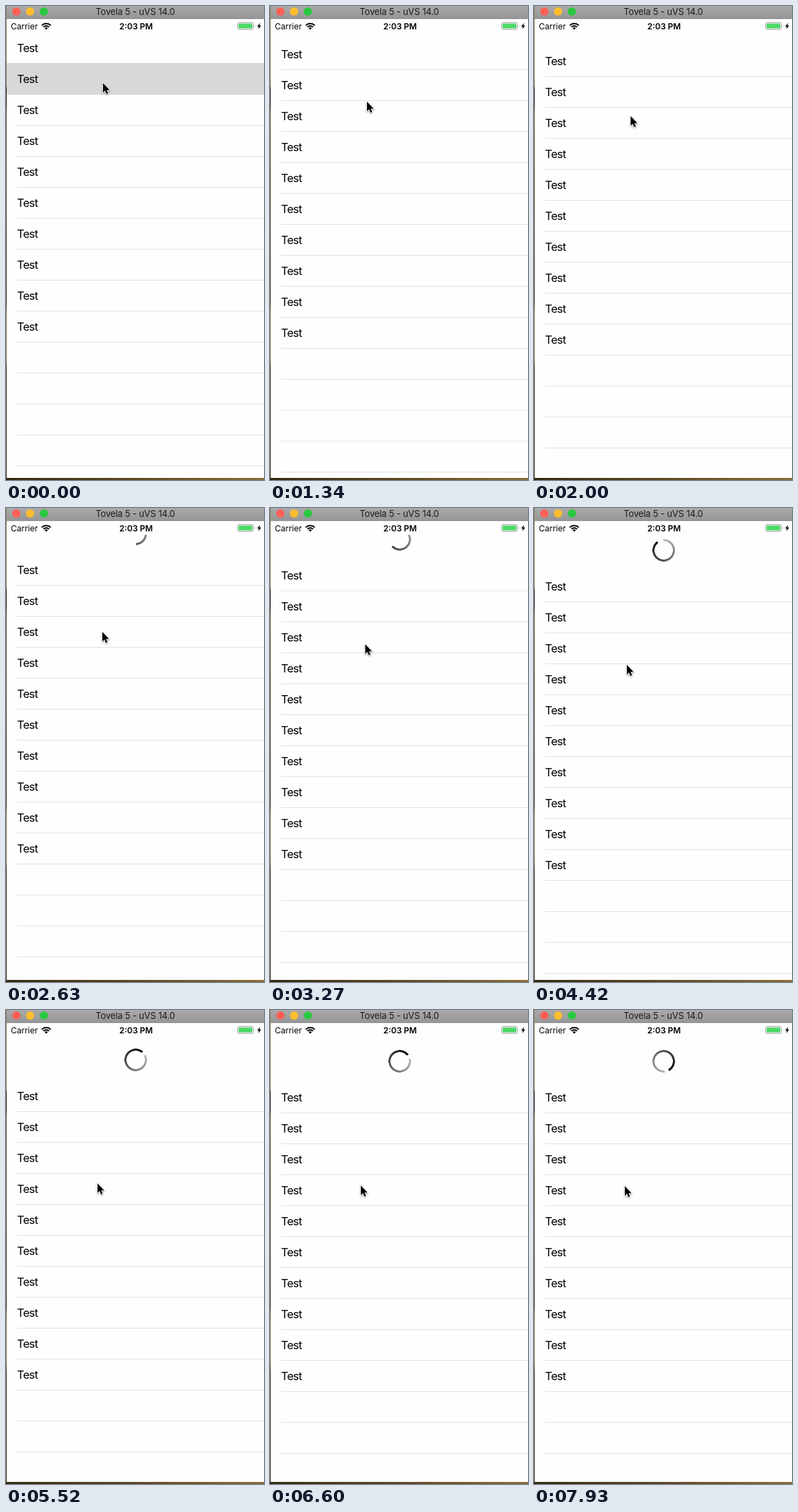
An HTML page for the animation above (7.99 s loop, 375 by 689 pixels).

```html
<!DOCTYPE html>
<html lang="en">
<head>
<meta charset="utf-8">
<title>Pull to refresh</title>
<style>
  @property --pull { syntax: "<integer>"; inherits: true; initial-value: 0; }
  @property --spin { syntax: "<angle>"; inherits: true; initial-value: 0deg; }

  html, body { margin: 0; width: 100%; height: 100%; overflow: hidden; }
  body { font-family: Inter, Roboto, sans-serif; color: #000; }

  #stage {
    position: relative; width: 375px; height: 689px; overflow: hidden;
    background:
      linear-gradient(90deg, #33290f, #57451f 45%, #8a6d38) 0 686px / 100% 3px no-repeat,
      linear-gradient(#8f8256 0 115px, #2b2314 120px 145px, #6d5c33 155px, #3b301a 430px, #8b7440 445px 515px, #3d3018 525px);
    animation: pull 7990ms linear infinite, spin 7990ms linear infinite;
  }
  #stage > *, #view > * { position: absolute; }

  #titlebar {
    left: 1px; top: 0; right: 0; height: 19px; line-height: 17px;
    background: linear-gradient(#aaa, #949494);
    font-size: 13px; letter-spacing: -.15px; text-align: center; color: #1c1c1c;
  }
  #titlebar i { position: absolute; top: 2px; width: 12px; height: 12px; border-radius: 50%; }

  #status { left: 1px; top: 19px; right: 0; height: 20px; background: #fefefe; font-size: 12px; line-height: 21px; }
  #status > * { position: absolute; top: 0; }
  #time { left: 0; right: 0; text-align: center; font-weight: 600; padding-left: 2px; }

  #view { left: 1px; top: 39px; right: 0; height: 647px; overflow: hidden; background: #fefefe; }

  #list {
    left: 0; right: 0; top: calc(var(--pull) * 1px); height: 675px; margin: 0; padding: 0 0 0 15px;
    list-style: none; font-size: 16.5px; letter-spacing: -.7px; line-height: 45px;
    background: repeating-linear-gradient(#0000 0 44px, #e1e1e3 44px 45px) 15px 0 no-repeat;
  }
  #list li { position: relative; height: 45px; }
  .pressed::before {
    content: ""; position: absolute; z-index: -1; left: -15px; right: 0; top: -1px; height: 46px;
    background: #d8d8d8; animation: press 7990ms linear infinite;
  }
  #list { isolation: isolate; }

  #spinner {
    left: 171px; top: calc(var(--pull) * 1px - 47px); width: 33px; height: 33px;
    background: conic-gradient(#bbb, #000 338deg);
    mask:
      conic-gradient(#000 min(var(--pull) * 6.1deg, 338deg), #0000 0),
      radial-gradient(circle, #0000 13px, #000 13.6px 16px, #0000 16.6px);
    mask-composite: intersect;
    transform: rotate(var(--spin));
  }

  #cursor {
    left: 0; top: 0; overflow: visible; filter: drop-shadow(0 1px 1px #0006);
    animation: drag 7990ms linear infinite;
  }

  @keyframes press {
    0%, 1.5% { visibility: visible; }
    1.501%, 100% { visibility: hidden; }
  }
  @keyframes pull {
    0%, 1.5% { --pull: 0; }
    8.89%, 11.01% { --pull: 2; }
    16.77% { --pull: 9; }
    20.53% { --pull: 14; }
    32.92% { --pull: 29; }
    40.93% { --pull: 37; }
    48.06% { --pull: 46; }
    50.94% { --pull: 49; }
    55.32% { --pull: 53; }
    61.2% { --pull: 58; }
    69.09% { --pull: 64; }
    71.96% { --pull: 65; }
    81.85%, 100% { --pull: 66; }
  }
  @keyframes spin {
    0%, 66.83% { --spin: 0deg; }
    100% { --spin: 913deg; }
  }
  @keyframes drag {
    0%, 1.5% { transform: translate(141px, 112px); }
    8.89%, 11.01% { transform: translate(141px, 125px); }
    16.77% { transform: translate(141px, 139px); }
    32.92% { transform: translate(140px, 180px); }
    48.06% { transform: translate(137px, 214px); }
    55.32% { transform: translate(135px, 228px); }
    69.09% { transform: translate(133px, 252px); }
    81.85% { transform: translate(132px, 255px); }
    92.12%, 100% { transform: translate(132px, 256px); }
  }
</style>
</head>
<body>
<div id="stage">
  <div id="view">
    <ul id="list">
      <li>Test</li>
      <li class="pressed">Test</li>
      <li>Test</li>
      <li>Test</li>
      <li>Test</li>
      <li>Test</li>
      <li>Test</li>
      <li>Test</li>
      <li>Test</li>
      <li>Test</li>
    </ul>
    <div id="spinner"></div>
  </div>

  <div id="titlebar">
    <i style="left:8px;background:#ff5f57"></i>
    <i style="left:28px;background:#ffbd2e"></i>
    <i style="left:48px;background:#28c940"></i>
    Tovela 5 - uVS 14.0
  </div>

  <div id="status">
    <span style="left:6px">Carrier</span>
    <svg style="left:50px;top:5px" width="15" height="11" fill="none" stroke="#000" stroke-width="2">
      <path d="M1 4.2a9.2 9.2 0 0 1 13 0M3.4 6.6a5.8 5.8 0 0 1 8.2 0"/>
      <path d="M7.5 10.4L5.2 8.2a3.3 3.3 0 0 1 4.6 0z" fill="#000" stroke="none"/>
    </svg>
    <span id="time">2:03 PM</span>
    <svg style="left:335px;top:4px" width="39" height="13">
      <rect x=".5" y="1" width="23" height="10" rx="2.5" fill="none" stroke="#999"/>
      <rect x="2" y="2.5" width="20" height="7" rx="1.2" fill="#4cd964"/>
      <path d="M25 4.2q1.5 1.8 0 3.6z" fill="#999"/>
      <path d="M33.3 1.5L29 6.8h2.6L30.6 10.7L35 5.4h-2.7z"/>
    </svg>
  </div>

  <svg id="cursor" width="12" height="18">
    <path d="M0 0V14L3.1 11.1L5.2 16L7.5 15L5.4 10.2H9.8Z" stroke="#fff" stroke-width="1.6" paint-order="stroke"/>
  </svg>
</div>
</body>
</html>
```
